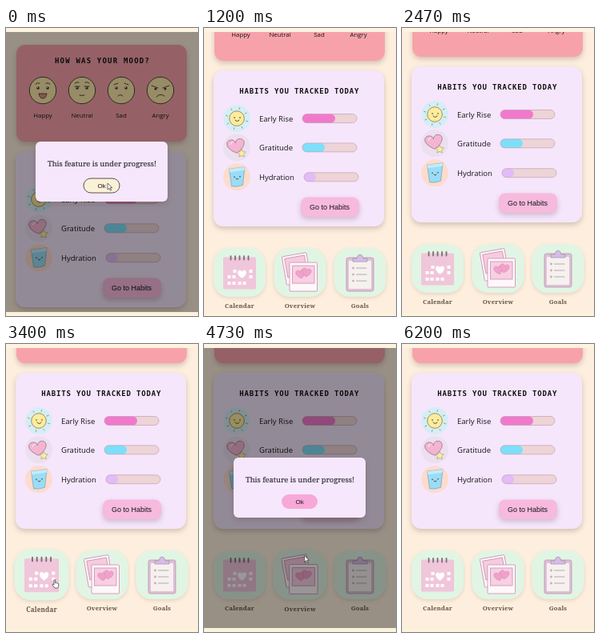
Write an HTML page that moves like this. It is 240 px wide and 360 px high and loops after 6270 ms.

```html
<!DOCTYPE html>
<html lang="en">
<head>
<meta charset="utf-8">
<title>Habit tracker</title>
<style>
html, body { margin: 0; width: 100%; height: 100%; overflow: hidden; background: #fef2e1; }
svg { display: block; width: 100vw; height: 100vh; }
text { text-anchor: middle; fill: #161616; }
.pixel { font: bold 9px "DejaVu Sans Mono", monospace; fill: #111; }
.mood { font: 7.8px "Open Sans", "Noto Sans", sans-serif; }
.habit { font: 9.5px "Open Sans", "Noto Sans", sans-serif; text-anchor: start; }
.tile { font: 600 7.7px "Noto Serif", serif; fill: #68564a; letter-spacing: .15px; }
.note { font: 500 9.3px "Noto Serif", serif; fill: #33303a; stroke: #33303a; stroke-width: .2; }
.btn { font: 9px "Liberation Sans", Arial, sans-serif; }
.ok { font-size: 8px; }
.line { fill: none; stroke: #3d3535; stroke-width: .9; stroke-linecap: round; stroke-linejoin: round; }
.card { filter: drop-shadow(0 3px 3px rgba(90, 60, 60, .25)); }
.soft { filter: drop-shadow(0 2px 2px rgba(90, 70, 60, .14)); }
.fading .tint { filter: saturate(.4); }
.fading .deep { filter: saturate(.25) brightness(.92); }
</style>
</head>
<body>
<svg id="stage" viewBox="0 0 240 360">
  <defs>
    <clipPath id="view"><path d="M0 5h240v350H0z"/></clipPath>
    <path id="heart" d="M0 7C-11 0-9-8-4-8-1-8 0-5 0-4 0-5 1-8 4-8 9-8 11 0 0 7z"/>
  </defs>
  <rect y="355" width="240" height="2" fill="#f8f3d6"/>
  <g clip-path="url(#view)">
    <rect y="5" width="240" height="350" fill="#fdeedd"/>
    <g id="page"></g>
    <g id="modal">
      <rect y="5" width="240" height="350" opacity=".4"/>
      <rect class="card" x="37" y="142" width="165" height="75" rx="6" fill="#f6e7fd"/>
      <text class="note" x="120" y="173">This feature is under progress!</text>
      <rect id="ok" x="97" y="188" width="45" height="18" rx="9"/>
      <text class="btn ok" x="119.7" y="199.6">Ok</text>
    </g>
  </g>
  <g id="cursor" fill="#fff" stroke="#333" stroke-width=".7" stroke-linejoin="round">
    <path id="arrow" d="M0 0v8l2-1.8 1.4 3 1.3-.6-1.4-2.9h2.5z"/>
    <path id="hand" d="M-1 0q1-1 1.7 0v4l1-.5 1 .5 1 0 1 .7v3l-1 2.5H0L-3 6q0-1.3 1-.8l1 .7z"/>
  </g>
</svg>
<script>
const LOOP = 6270, STEP = 200 / 3;
const $ = id => document.getElementById(id);

const rect = (x, y, w, h, r, fill, more = '') =>
  `<rect x="${x}" y="${y}" width="${w}" height="${h}" rx="${r}" fill="${fill}" ${more}/>`;
const disc = (x, y, r, fill, more = '') => `<circle cx="${x}" cy="${y}" r="${r}" fill="${fill}" ${more}/>`;
const text = (s, x, y, cls, more = '') => `<text class="${cls}" x="${x}" y="${y}" ${more}>${s}</text>`;
const line = (d, more = '') => `<path class="line" d="${d}" ${more}/>`;
const at = (x, y, body, more = '') => `<g transform="translate(${x} ${y}) ${more}">${body}</g>`;
const heart = (x, y, k, fill, more = '') => at(x, y, `<use href="#heart" fill="${fill}" ${more}/>`, k);
const dots = (points, r) => points.map(([x, y]) => disc(x, y, r, '#3d3535')).join('');

const eyes = dots([[-6, -3], [6, -3]], 1.8) + disc(-6.5, -3.6, .6, '#fff') + disc(5.5, -3.6, .6, '#fff');
const moods = [
  ['Happy', eyes + line('M-9-8q2-2 5-1M4-9q3-1 5 1') +
    '<path d="M-5 4H5Q4 10 0 10T-5 4z" fill="#e98b86" stroke="#3d3535" stroke-width=".8"/>'],
  ['Neutral', eyes + line('M-9-5h6M3-5h6M-9-9q3-2 5-1M4-10q3-1 5 1M-3 6q3 1 6 0')],
  ['Sad', eyes + line('M-9-7l5-2M4-9l5 2M-4 7q3-3 6 0')],
  ['Angry', dots([[-6, -2], [6, -2]], 1.5) + line('M-11-6l8 3M11-6l-8 3M-5 8q5-5 10-1')]
];

const sun = Array.from({ length: 8 }, (_, i) =>
    `<path d="M0-12v-2" stroke="#a99a55" stroke-width=".9" stroke-linecap="round" transform="rotate(${i * 45 + 15})"/>`).join('') +
  disc(0, 0, 9.3, '#fcec9c', 'stroke="#75683c" stroke-width=".7"') +
  dots([[-3, -1], [4, -1]], .8) + line('M-2 2q2.5 3 5 0');
const love = heart(-1, -1, 'rotate(-8) scale(1.35 1.15)', '#f5b4d2', 'stroke="#7c6470" stroke-width=".5"') +
  line('M-8-4q1-3 3-3', 'style="stroke:#fff"') +
  '<path d="M6 2l1.7 3.2 3.5.4-2.5 2.5.6 3.5L6 10l-3.2 1.6.6-3.5L1 5.6l3.4-.4z" fill="#fbee9f" stroke="#8f8358" stroke-width=".5"/>';
const glass = '<path d="M-9.5-10L10-12.500 7.500 10Q0 13-6.500 11.500z" fill="#9bdcf6" stroke="#6f95a8" stroke-width=".6"/>' +
  '<path d="M-9.5-10L10-12.500l-.5 4L-8.800-6z" fill="#c4ebf9"/>' +
  dots([[-3, 0], [4, -.5]], .8) + line('M-1 2q1.5 2 3 0');

const habits = [
  ['Early Rise', 96, 123, 41, '#f079cc', '#d4eef7', sun],
  ['Gratitude', 132.3, 123, 28, '#7ddffa', '#ebdff0', love],
  ['Hydration', 169.2, 125, 15, '#e2bbf8', '#fddccd', glass]
];

const box = (x, y) => rect(x, y, 4, 3.8, .6, '#fff');
const calendar = rect(-20.5, -25.5, 41, 40, 1.5, '#f0c6da') +
  [-11, -5.5, 0, 5.5, 11].map(x => line(`M${x}-27v4.5`, 'style="stroke:#777078;stroke-width:1.8"')).join('') +
  [[-8, -10], [12, -10], [-15, -3], [-9, -3], [12, -3], [-15, 5], [-9, 5], [-2, 5], [4, 5]]
    .map(p => box(...p)).join('') + heart(3, -4, 'scale(.68)', '#fff');
const frame = 'stroke="#cf97b6" stroke-width=".9"';
const photos = at(-5, -12, rect(-15, -17, 31, 36, 1, '#fff7fa', frame) + rect(-12, -14, 25, 24, 0, '#f6cbdf', frame), 'rotate(-10)') +
  rect(-13, -19, 34.5, 36, 1, '#fff7fa', frame) + rect(-9.5, -15, 27.5, 22, 0, '#f8cfe3', frame) +
  heart(1, -4, 'rotate(-12) scale(.7)', '#f3a0cb', frame) + heart(8, -6, 'rotate(12) scale(.7)', '#f3a0cb', frame);
const board = rect(-17, -25, 34, 42, 2.5, '#e2bfd8', 'stroke="#a5909f" stroke-width=".7"') + rect(-14, -21, 28, 35, 1, '#f5f1ee') +
  '<path d="M-9-20v-4h5q1-5 4-5t4 5h5v4z" fill="#d6bde6" stroke="#a08fab" stroke-width=".7"/>' +
  [-12, -4, 4].map(y => disc(-8.5, y, 1.4, '#d9a3bd') + line(`M-4.5 ${y}H8`, 'style="stroke:#a3979d;stroke-width:.8"')).join('');

// Each tile: label, centre x, icon, hover start, hover end.
const tiles = [
  ['Calendar', 44.5, calendar, 3130, 3530],
  ['Overview', 120, photos, 4330, 4660],
  ['Goals', 195, board, 5130, 5530]
];

$('page').innerHTML =
  `<g class="tint deep">${rect(13, -97, 213, 121, 11, '#f7a2aa', 'class="card"')}</g>` +
  text('HOW WAS YOUR MOOD?', 120.5, -74, 'pixel', 'letter-spacing="1.2"') +
  moods.map(([name, face], i) => at(46 + i * 49, -40,
    disc(0, 0, 16.7, '#fbe9a9', 'stroke="#4a4238" stroke-width="1"') + face + text(name, 0, 33.5, 'mood'))).join('') +
  rect(12, 36, 213, 195, 12, '#f5e6fc', 'class="card"') +
  text('HABITS YOU TRACKED TODAY', 119.3, 65, 'pixel', 'letter-spacing=".83"') +
  habits.map(([name, y, x, w, color, back, icon]) =>
    `<g class="tint">${at(41, y, disc(0, 0, 17, back) + icon)}${rect(x, y - 5.5, 68, 11, 5.5, '#edd4d7')}` +
    `${rect(x, y - 5.5, w, 11, 5.5, color)}${rect(x, y - 5.5, 68, 11, 5.5, 'none', 'stroke="#c3a0ae" stroke-width=".7"')}</g>` +
    text(name, 69, y + 3.6, 'habit')).join('') +
  `<g class="tint deep">${rect(121, 194.5, 73, 24.5, 8, '#f7bade', 'class="card"')}</g>` +
  text('Go to Habits', 157, 209.7, 'btn') +
  tiles.map(([name, x, icon], i) => `<g id="tile${i}">` +
    `<g class="tint">${rect(-32.5, -37, 65, 61, 20, '#e1f5e4', 'class="soft"')}${icon}</g>` +
    text(name, 0, 38, 'tile') + '</g>').join('');

const modals = [[0, 130], [1660, 2200], [3530, 4130], [4660, 5060], [5590, 6070]];
const scroll = [[350, 118], [800, 51], [1260, 12], [2730, 12], [3130, 0]];
const path = [
  [0, 127, 194], [1330, 165, 240], [1530, 150, 212], [1660, 146, 214], [1800, 133, 206], [2000, 127, 195],
  [2730, 127, 195], [3200, 61, 295], [3530, 61, 295], [3930, 129, 196], [4130, 129, 196], [4400, 125, 290],
  [4660, 125, 290], [4930, 127, 196], [5060, 127, 196], [5260, 188, 290], [5590, 188, 290], [5870, 127, 196]
];

function tween(keys, t) {
  const i = keys.findIndex(k => k[0] > t);
  if (i === 0) return keys[0].slice(1);
  if (i < 0) return keys[keys.length - 1].slice(1);
  const a = keys[i - 1], b = keys[i], p = (t - a[0]) / (b[0] - a[0]);
  return a.slice(1).map((v, j) => v + (b[j + 1] - v) * p);
}
const inside = (t, [a, b]) => t >= a && t < b;
const clamp = v => Math.max(0, Math.min(1, v));

function draw(t) {
  const [y] = tween(scroll, t), [cx, cy] = tween(path, t);
  const open = modals.some(m => inside(t, m));
  $('page').setAttribute('transform', `translate(0 ${y})`);
  $('modal').style.display = open ? '' : 'none';
  $('stage').classList.toggle('fading', modals.some(m => inside(t, [m[1], m[1] + STEP])));

  const onOk = cx > 97 && cx < 142 && cy > 188 && cy < 205;
  $('ok').setAttribute('fill', onOk ? '#fbf1d9' : '#f7a8d8');
  $('ok').setAttribute('stroke', onOk ? '#5c5148' : 'none');

  let hover = cx > 121 && cx < 194 && cy > y + 195 && cy < y + 220;
  tiles.forEach(([, x, , from, to], i) => {
    const k = Math.min(clamp((t - from) / 200), clamp((to + 150 - t) / 150));
    hover = hover || k > .5;
    $('tile' + i).setAttribute('transform', `translate(${x} 295) scale(${1 + .05 * k})`);
  });

  const hidden = inside(t, [200, 1400]) || inside(t, [2330, 2730]) || t > 6130;
  const hand = hover && !open;
  $('cursor').style.display = hidden ? 'none' : '';
  $('cursor').setAttribute('transform', `translate(${cx} ${cy})`);
  $('hand').style.display = hand ? '' : 'none';
  $('arrow').style.display = hand ? 'none' : '';
}

const start = performance.now();
function tick() {
  const t = (performance.now() - start) % LOOP;
  draw(Math.floor((t + 5) / STEP) * STEP);
  requestAnimationFrame(tick);
}
tick();
</script>
</body>
</html>
```
